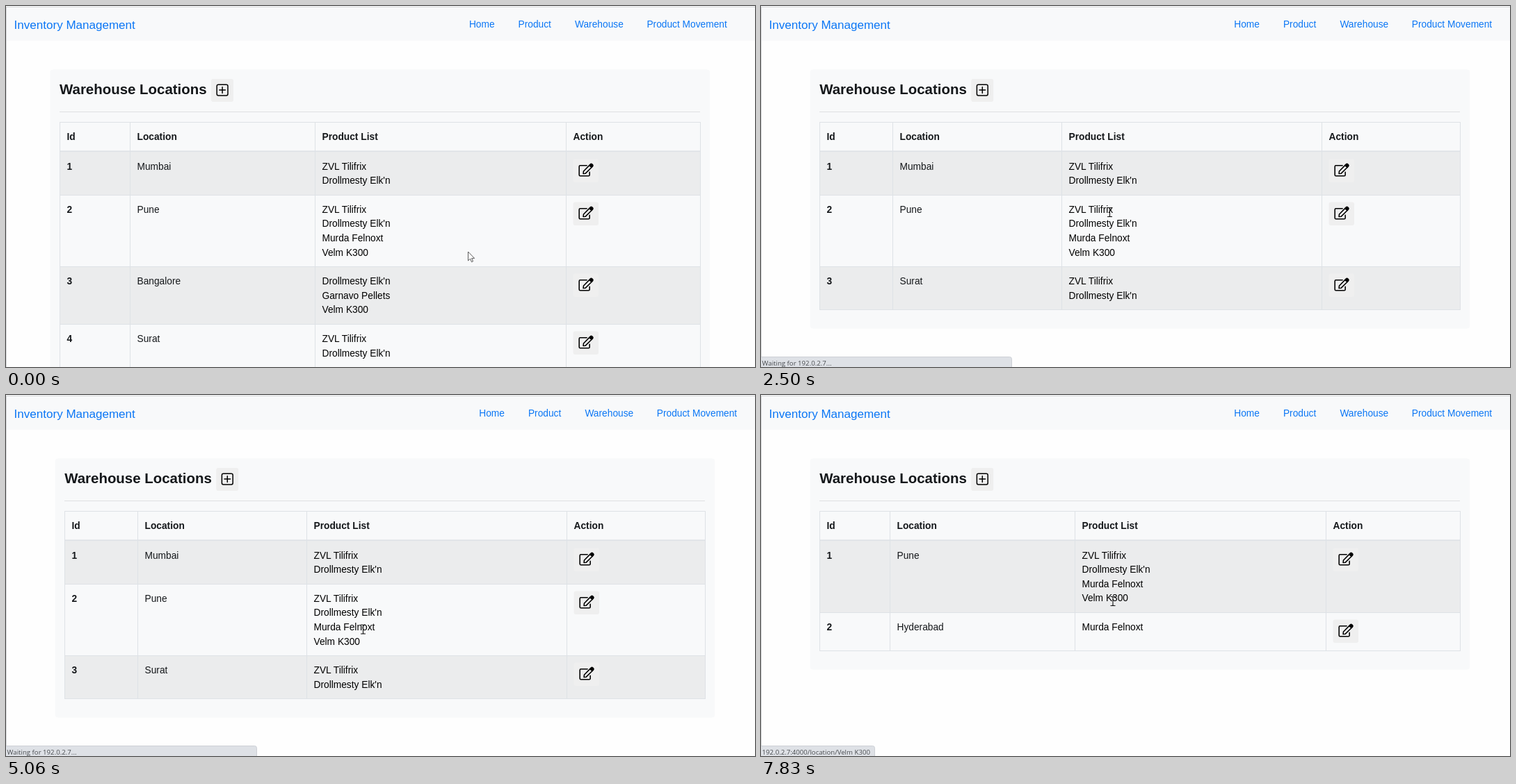
Write an HTML page that moves like this. It is 1077 by 520 pixels and loops after 8 s.

```html
<!DOCTYPE html>
<html lang="en">
<head>
<meta charset="utf-8">
<title>Inventory Management</title>
<style>
  html, body { margin: 0; width: 100%; height: 100%; overflow: hidden; background: #fefefe; }
  svg { display: block; }
  text { font: 13.76px "Liberation Sans", Arial, sans-serif; fill: #14171a; white-space: pre; }
  .bold { font-weight: 700; }
  .title { font-size: 20.45px; font-weight: 700; }
  .brand { font-size: 17.05px; }
  .link { fill: #0a76f5; }
  .item { fill: #000; }
  #status text { font: 9.65px "Open Sans", "Noto Sans", sans-serif; fill: #484b4f; }
</style>
</head>
<body>
<svg id="stage" width="1077" height="520" viewBox="0 0 1077 520">
  <defs>
    <g id="edit">
      <rect width="36.5" height="33.5" rx="3" fill="#efefef"/>
      <g transform="translate(7.8 5.9) scale(.0374)" fill="none" stroke="#000" stroke-width="42" stroke-linejoin="round">
        <path d="M316 88H62Q24 88 24 126V450Q24 488 62 488H386Q424 488 424 450V345" stroke-linecap="round"/>
        <path d="M418 78L500 160 266 392 182 402 192 306Z" fill="#efefef"/>
        <path d="M418 78L458 36Q488 10 516 36L543 63Q566 90 541 118L500 160Z" fill="#000"/>
      </g>
    </g>
    <g id="plus">
      <rect width="32" height="33" rx="3" fill="#efefef"/>
      <g fill="none" stroke="#000" stroke-width="1.5">
        <rect x="8.2" y="8.2" width="15.8" height="15.8" rx="2.2"/>
        <path d="M16.1 11.8V20.4M11.8 16.1H20.4" stroke-linecap="round"/>
      </g>
    </g>
  </defs>
  <rect width="1077" height="50" fill="#f8f9fa"/>
  <text class="brand link" x="11.6" y="32.6">Inventory Management</text>
  <g id="pages"></g>
  <path d="M0 1.5H1077M.5 1V520" stroke="#d9dadc"/>
  <g id="status">
    <path id="bar" fill="#dee1e6" stroke="#cdd0d5"/>
    <text id="note" x="1.6" y="518"></text>
  </g>
  <g id="cursor">
    <path id="arrow" d="M.5 .5V13.3L3.5 10.6 5.5 15.2 7.5 14.3 5.6 9.9H9.6Z" fill="#fff" stroke="#333" stroke-width=".8"/>
    <path id="beam" d="M-3.5-6.5H-1.2Q0-6.5 0-5.5Q0-6.5 1.2-6.5H3.5M0-5.5V5.5M-3.5 6.5H-1.2Q0 6.5 0 5.5Q0 6.5 1.2 6.5H3.5" fill="none" stroke="#111" stroke-width="1.1"/>
    <g id="ring" transform="translate(-2 -1.3)" fill="none" stroke-width="3.4">
      <circle r="8.5" stroke="#1a86c8"/>
      <path d="M0-8.5A8.5 8.5 0 0 1 8.5 0" stroke="#7fd4f5"/>
    </g>
  </g>
</svg>
<script>
const LOOP = 8000;
const $ = id => document.getElementById(id);

const A = "ZVL Tilifrix", B = "Drollmesty Elk'n", C = "Murda Felnoxt",
      D = "Velm K300", E = "Garnavo Pellets";
const HOST = "192.0.2.7";
const url = name => `${HOST}:4000/location/${name.replace("'", "%27")}`;
const WAIT = `Waiting for ${HOST}...`;

const pages = [
  { from: 0, dx: 0, cols: [77, 178, 444, 805, 998],
    rows: [["Mumbai", A, B], ["Pune", A, B, C, D], ["Bangalore", B, E, D], ["Surat", A, B]] },
  { from: 2500, dx: 7.2, cols: [84, 189, 432, 806, 1005],
    rows: [["Mumbai", A, B], ["Pune", A, B, C, D], ["Surat", A, B]] },
  { from: 5210, dx: 7.2, cols: [84, 185, 451, 812, 1005],
    rows: [["Pune", A, B, C, D], ["Hyderabad", C]] }
];

const text = (x, y, s, cls = "") => `<text class="${cls}" x="${x}" y="${y}">${s}</text>`;
const rect = (x, y, w, h, fill, more = "") =>
  `<rect x="${x}" y="${y}" width="${w}" height="${h}" fill="${fill}" ${more}/>`;
const LINE = "#dee2e6", PAD = 10.5, PITCH = 20.64;

function drawPage({ dx, cols, rows }) {
  const left = cols[0], width = cols[4] - left;
  let body = "", y = 209.5;
  rows.forEach(([place, ...items], i) => {
    const height = Math.max(items.length * PITCH + 20.9, 54.8);
    const top = Math.round(y), base = y + 26;
    if (i % 2 === 0) body += rect(left, top, width, Math.round(y + height) - top, "#000", 'opacity=".05"');
    if (i) body += rect(left, top, width + 1, 1, LINE);
    body += text(left + PAD, base, i + 1, "bold") + text(cols[1] + PAD, base, place);
    items.forEach((s, k) => body += text(cols[2] + PAD, base + k * PITCH, s, "item"));
    body += `<use href="#edit" x="${cols[3] + PAD}" y="${top + 10.6}"/>`;
    y += height;
  });
  const end = Math.round(y);
  const heads = ["Id", "Location", "Product List", "Action"]
    .map((s, i) => text(cols[i] + PAD, 193.1, s, "bold")).join("");
  const lines = cols.map(x => rect(x, 167, 1, end - 167, LINE)).join("");
  const nav = [["Home", 665.9], ["Product", 736.5], ["Warehouse", 818], ["Product Movement", 921.4]]
    .map(([s, x]) => text(x + dx * 2, 31, s, "link")).join("");
  return "<g>" + nav +
    rect(63.5 + dx, 91.5, 948.5, end + 27.5 - 91.5, "#f8f9fa", 'rx="4"') +
    text(77 + dx, 127, "Warehouse Locations", "title") +
    `<use href="#plus" x="${295 + dx}" y="105"/>` +
    rect(left, 152, width, 1, "#dfe0e2") + body + heads + lines +
    rect(left, 167, width + 1, 1, LINE) + rect(left, 208.4, width + 1, 1.7, LINE) +
    rect(left, end, width + 1, 1, LINE) + "</g>";
}
$("pages").innerHTML = pages.map(drawPage).join("");
const groups = [...$("pages").children];

// start, end, steps, target x, target y
const START = [664, 353.5];
const moves = [
  [70, 470, 6, 535, 319],
  [840, 1020, 3, 502, 301],
  [1100, 1320, 4, 501.5, 297],
  [3430, 3570, 3, 502.5, 300.5],
  [3880, 4190, 5, 513.5, 337.5],
  [6510, 6830, 5, 508, 303],
  [6910, 7220, 5, 506, 297]
];
const shapes = [
  [0, "arrow"], [390, "beam"], [920, "arrow"], [1170, "beam"], [1870, "ring"],
  [2090, "arrow"], [2330, "beam"], [3500, "arrow"], [4030, "beam"], [4570, "ring"],
  [4810, "beam"], [6590, "arrow"], [7140, "beam"], [7600, "ring"], [7830, "beam"]
];
// time, note, opacity
const notes = [
  [0, "", 0], [610, url(B), .5], [700, url(B), 1], [1170, url(A), 1], [2330, WAIT, 1],
  [3500, url(B), 1], [4110, url(C), 1], [5060, WAIT, 1], [5580, WAIT, .65],
  [5655, WAIT, .3], [5730, "", 0], [7370, url(D), .5], [7460, url(D), 1]
];

const ease = p => p * p * (3 - 2 * p);
const latest = (list, t) => list.filter(e => e[0] <= t).pop();

function pointer(t) {
  let [x, y] = START;
  for (const [t0, t1, n, tx, ty] of moves) {
    if (t < t0) break;
    const step = Math.min(n, 1 + Math.floor((t - t0) / (t1 - t0) * (n - 1) + 1e-6));
    const p = ease(step / n);
    x += (tx - x) * p;
    y += (ty - y) * p;
  }
  return [x, y];
}

function showStatus([, note, alpha]) {
  $("status").setAttribute("opacity", alpha);
  if (!note) return;
  $("note").textContent = note;
  const w = note === WAIT ? 360.5 : Math.round($("note").getComputedTextLength()) + 8.5;
  $("bar").setAttribute("d", `M-1 505.5H${w - 3}Q${w} 505.5 ${w} 508.5V522H-1Z`);
}

function draw(t) {
  const page = pages.filter(p => p.from <= t).length - 1;
  groups.forEach((g, i) => g.style.display = i === page ? "" : "none");
  const [x, y] = pointer(t), shape = latest(shapes, t)[1];
  $("cursor").setAttribute("transform", `translate(${x} ${y})`);
  for (const id of ["arrow", "beam", "ring"]) $(id).style.display = id === shape ? "" : "none";
  showStatus(latest(notes, t));
}

const began = performance.now();
function tick() {
  draw((performance.now() - began) % LOOP);
  requestAnimationFrame(tick);
}
tick();
</script>
</body>
</html>
```
